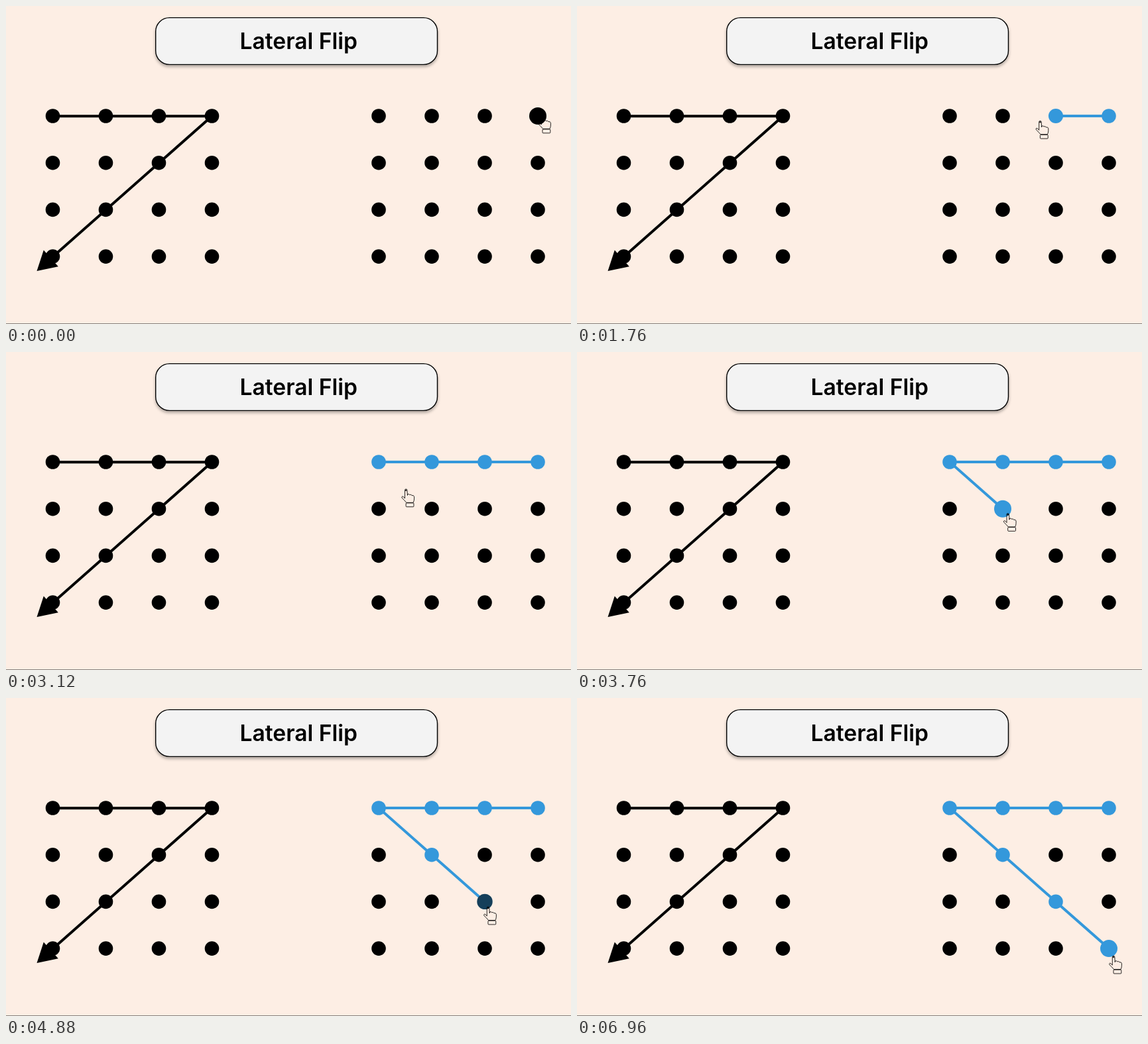
Animation of 852x480 px, one loop 7040 ms. Source, as an HTML page:

```html
<!DOCTYPE html>
<html lang="en">
<head>
<meta charset="utf-8">
<title>Lateral Flip</title>
<style>
  html, body { margin: 0; width: 100%; height: 100%; overflow: hidden; background: #fdeee4; }
  svg { display: block; width: 852px; height: 480px; }
  .card { fill: #f3f3f3; stroke: #000; stroke-width: 1.4; filter: drop-shadow(0 3px 2px rgba(0, 0, 0, .3)); }
  .title { font: 600 33.6px Inter, sans-serif; text-anchor: middle; }
  .path { fill: none; stroke: #000; stroke-width: 4; }
  #trace line { stroke: #3498db; stroke-width: 4; }
  #hand { fill: none; stroke: #000; stroke-width: .85; stroke-linejoin: round; }
</style>
</head>
<body>
<svg viewBox="0 0 852 480">
  <rect width="852" height="480" fill="#fdeee4"/>
  <rect y="479" width="852" height="1" fill="#85807d"/>
  <rect class="card" x="225.7" y="17.6" width="424.8" height="70.8" rx="21"/>
  <text class="title" x="441.3" y="65">Lateral Flip</text>
  <path class="path" d="M70.5 166.3H310.5L70 379"/>
  <path d="M46.5 400L56.8 368.5L78.8 393.2Z"/>
  <g id="trace"></g>
  <g id="dots"></g>
  <g id="hand">
    <path d="M-1.7 14V1.6Q-1.6 0 0 0Q1.7 0 1.8 1.6L2.3 9.5V8Q4.2 6.6 5.6 8.6Q7.6 7.6 9 9.6Q11.8 9 12.4 11.4V15Q12.3 18 11 20.4H.6Q-2 17 -6 13.4Q-7 11.6 -5.4 11Q-3.8 11 -1.7 14Z"/>
    <rect y="21" width="11.8" height="5.8" rx="1"/>
    <circle cy="1.9" r=".8" fill="#000"/>
  </g>
</svg>
<script>
  const LOOP = 7040, TICK = 80, FADE = 300;
  const RADIUS = 10.8, GROWTH = 2.2;
  const BLUE = [52, 152, 219];
  const SAG = 9;

  const byId = id => document.getElementById(id);
  const clamp = p => Math.min(Math.max(p, 0), 1);
  const easeOut = p => 1 - (1 - clamp(p)) ** 2;
  const add = (parent, tag, attrs) => {
    const node = document.createElementNS("http://www.w3.org/2000/svg", tag);
    for (const key in attrs) node.setAttribute(key, attrs[key]);
    return parent.appendChild(node);
  };

  const drawGrid = left => Array.from({ length: 16 }, (_, i) =>
    add(byId("dots"), "circle", { cx: left + i % 4 * 80, cy: 166 + (i >> 2) * 70.7, r: RADIUS }));
  drawGrid(70.5);
  const grid = drawGrid(562);

  // The figure runs left along the top row, then down the diagonal.
  const stops = [540, 1400, 2080, 2500, 3450, 4810, 6030].map((touch, i) => {
    const col = Math.abs(3 - i), row = Math.max(i - 3, 0);
    const dot = grid[row * 4 + col];
    const x = 562 + col * 80, y = 166 + row * 70.7;
    return {
      dot, x, y, touch,
      arrive: touch + 100,
      leave: i === 6 ? Infinity : touch + (i < 3 ? 100 : 300),
      handX: x + 7,
      handY: y - 1 + 7 * Math.sqrt(row)
    };
  });
  stops.forEach((stop, i) => {
    const from = stops[Math.max(i - 1, 0)];
    stop.line = add(byId("trace"), "line", { x1: from.x, y1: from.y, x2: stop.x, y2: stop.y });
  });

  // The hand rests at each stop and sags a little on the way to the next.
  function handAt(t) {
    const next = stops.findIndex(stop => t < stop.leave);
    const to = stops[next], from = stops[Math.max(next - 1, 0)];
    const p = next ? clamp((t - from.leave) / (to.arrive - from.leave)) : 1;
    return [
      from.handX + (to.handX - from.handX) * p,
      from.handY + (to.handY - from.handY) * p + SAG * Math.sin(Math.PI * p)
    ];
  }

  function draw(t) {
    stops.forEach(({ dot, line, touch, leave }, i) => {
      const tint = easeOut((t - touch) / FADE);
      const grown = i ? tint : 1;
      const size = grown - easeOut((t - leave - 60) / FADE);
      dot.setAttribute("r", RADIUS + GROWTH * Math.max(size, 0));
      dot.setAttribute("fill", `rgb(${BLUE.map(c => Math.round(c * tint))})`);
      line.setAttribute("visibility", t >= touch ? "visible" : "hidden");
    });
    byId("hand").setAttribute("transform", `translate(${handAt(t)})`);
  }

  const begin = performance.now();
  function frame() {
    const t = (performance.now() - begin) % LOOP;
    draw(Math.floor(t / TICK) * TICK);
    requestAnimationFrame(frame);
  }
  frame();
</script>
</body>
</html>
```
